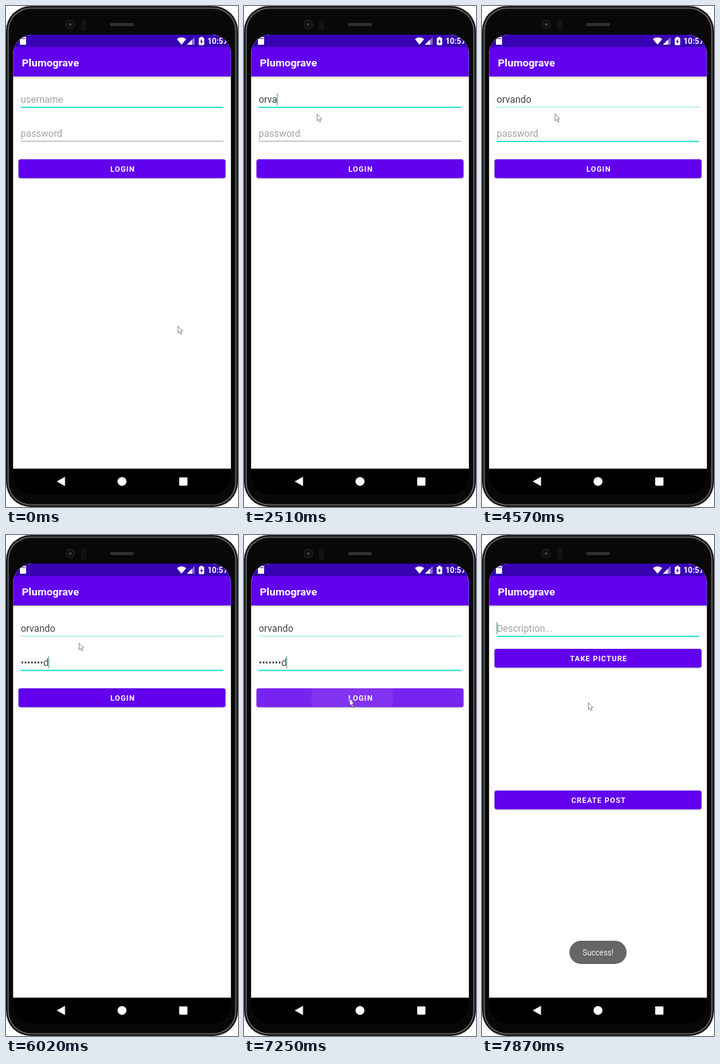
These frames come from a looping animation (300x647 px, 8 s). An HTML page with a canvas:

```html
<!DOCTYPE html>
<html lang="en">
<head>
<meta charset="utf-8">
<title>Login demo</title>
<style>
  html, body { margin: 0; width: 100%; height: 100%; overflow: hidden; background: #fff; }
  canvas { display: block; width: 300px; height: 647px; }
</style>
</head>
<body>
<canvas id="stage"></canvas>
<script>
const W = 300, H = 647, LOOP = 8000;
const PURPLE = '#6200ee', DEEP = '#3700b3', TEAL = '#03dac5', HINT = '#a3a3a3', INK = '#454545';
const canvas = document.getElementById('stage');
const ctx = canvas.getContext('2d');
const ratio = window.devicePixelRatio || 1;
canvas.width = W * ratio;
canvas.height = H * ratio;

// The screen refreshes in coarse ticks; every event below is timed in ticks.
const TICK = 206.6, FIRST_TICK = 222;
const FOCUS = 18, PRESS = 33, OPEN = 36;
const userStart = { text: 'orva', from: 6, to: 11 };
const userEnd = { text: 'ndo', from: 14, to: 17 };
const password = { text: 'password', from: 22, to: 28 };
const inputs = [userStart, userEnd, { from: FOCUS, to: FOCUS }, password, { from: OPEN, to: OPEN }];

const progress = (n, from, to) => Math.min(1, Math.max(0, (n - from) / (to - from)));
const ease = p => p * p * (3 - 2 * p);

function typed({ text, from, to }, n) {
  if (n < from) return '';
  return text.slice(0, 1 + Math.round((text.length - 1) * progress(n, from, to)));
}

// The caret blinks, three ticks on and two off, restarting with each input.
function caretVisible(n) {
  const last = Math.max(0, ...inputs.map(({ from, to }) => n < from ? 0 : Math.min(n, to)));
  return (n - last + 5) % 5 < 3;
}

function pointerAt(n) {
  const toField = ease(progress(n, -1, 3));
  const toButton = ease(progress(n, 28, PRESS));
  const drift = progress(n, 34, 37);
  return [222 - 128 * toField + 42 * toButton + drift, 413 - 274 * toField + 72 * toButton + 5 * drift];
}

function rect(x, y, w, h, color) {
  ctx.fillStyle = color;
  ctx.fillRect(x, y, w, h);
}

function rounded(x, y, w, h, r, color) {
  ctx.beginPath();
  ctx.roundRect(x, y, w, h, r);
  ctx.fillStyle = color;
  ctx.fill();
}

function disc(x, y, r, color) {
  ctx.beginPath();
  ctx.arc(x, y, r, 0, Math.PI * 2);
  ctx.fillStyle = color;
  ctx.fill();
}

function poly(color, ...points) {
  ctx.beginPath();
  for (let i = 0; i < points.length; i += 2) ctx.lineTo(points[i], points[i + 1]);
  ctx.closePath();
  ctx.fillStyle = color;
  ctx.fill();
}

function label(str, x, y, size, color, { weight = 400, align = 'left', spacing = 0 } = {}) {
  ctx.font = `${weight} ${size}px Roboto, sans-serif`;
  ctx.letterSpacing = spacing + 'px';
  ctx.textAlign = align;
  ctx.fillStyle = color;
  ctx.fillText(str, x, y);
  const width = ctx.measureText(str).width;
  ctx.letterSpacing = '0px';
  return width;
}

function drawBody() {
  const shell = (inset, color) => rounded(inset, inset, W - 2 * inset, H - 2 * inset, 32 - inset, color);
  shell(0, '#1c1c1c');
  shell(2.4, '#7c7c7c');
  shell(3.5, '#080808');

  disc(83, 24, 6.5, '#191919');
  disc(83, 24, 4, '#0c0c0e');
  disc(83, 24, 2, '#3a3a40');
  rounded(97, 17, 7, 15, 2, '#121212');
  rounded(134.5, 22, 31, 4, 2, '#303030');
}

function drawStatusBar() {
  rect(9, 37, 282, 16.5, DEEP);
  poly('#fff', 18, 43, 20.6, 40, 26, 40, 26, 50, 18, 50);
  for (let i = 0; i < 3; i++) rect(20.6 + i * 1.7, 41, .8, 2, DEEP);

  ctx.beginPath();
  ctx.moveTo(227, 50);
  ctx.lineTo(221, 42.7);
  ctx.quadraticCurveTo(227, 38.3, 233, 42.7);
  ctx.closePath();
  ctx.fillStyle = '#fff';
  ctx.fill();

  poly('rgba(255,255,255,.4)', 234, 50, 244, 40, 244, 50);
  poly('#fff', 234, 50, 240.5, 43.5, 240.5, 50);

  rounded(249.3, 41, 7, 9.5, 1, '#fff');
  rect(251.3, 39.8, 3, 1.5, '#fff');
  poly(DEEP, 253.4, 42.3, 250.9, 46.4, 252.5, 46.4, 252.2, 49.2, 254.7, 45.2, 253.1, 45.2);
  label('10:57', 260.5, 49, 10.2, '#fff', { weight: 700 });
}

function drawAppBar() {
  const shade = ctx.createLinearGradient(0, 91, 0, 94);
  shade.addColorStop(0, 'rgba(0,0,0,.22)');
  shade.addColorStop(1, 'rgba(0,0,0,0)');
  rect(9, 91, 282, 3, shade);
  rect(9, 53, 282, 38, PURPLE);
  label('Plumograve', 20.5, 78, 13.7, '#fff', { weight: 700 });
}

function drawField(baseline, text, hint, lineColor, lineHeight, caret) {
  const width = text ? label(text, 19, baseline, 12.35, INK) : 0;
  if (!text) label(hint, 19, baseline, 12.35, HINT);
  rect(19, baseline + 5.2, 262, lineHeight, lineColor);
  if (caret) rect(18.6 + width, baseline - 12.5, 1, 16, '#4a9f97');
}

function drawButton(y, text, held = -1) {
  ctx.save();
  ctx.shadowColor = 'rgba(0,0,0,.3)';
  ctx.shadowBlur = 2 * ratio;
  ctx.shadowOffsetY = .7 * ratio;
  rounded(16.2, y, 267.6, 24.2, 2.7, PURPLE);
  ctx.restore();
  if (held >= 0) {
    ctx.save();
    ctx.beginPath();
    ctx.roundRect(16.2, y, 267.6, 24.2, 2.7);
    ctx.clip();
    rect(16, y, 268, 25, `rgba(255,255,255,${Math.min(.14, .07 * (held + 1))})`);
    disc(140, y + 12, 24 * 2.2 ** held, 'rgba(255,255,255,.07)');
    ctx.restore();
  }
  label(text, 150.9, y + 15.8, 9.6, '#fff', { weight: 700, align: 'center', spacing: .8 });
}

function drawLogin(n) {
  const onPass = n >= FOCUS;
  const caret = caretVisible(n);
  const name = typed(userStart, n) + typed(userEnd, n);
  const masked = typed(password, n).replace(/.(?=.)/g, '•');
  drawField(125, name, 'username', onPass ? '#93e3da' : TEAL, onPass ? 1 : 1.4, caret && !onPass);
  drawField(169, masked, 'password', onPass ? TEAL : HINT, onPass ? 1.4 : 1, caret && onPass);
  drawButton(198, 'LOGIN', n - PRESS);
}

function drawPost(n) {
  drawField(125, '', 'Description...', TEAL, 1.4, caretVisible(n));
  drawButton(147, 'TAKE PICTURE');
  drawButton(330, 'CREATE POST');
  ctx.globalAlpha = progress(n, OPEN - 1, OPEN + 1);
  rounded(113, 524, 74, 30, 15, '#666');
  label('Success!', 150, 543, 10, '#f0f0f0', { align: 'center' });
  ctx.globalAlpha = 1;
}

function drawNavBar() {
  rect(9, 597.5, 282, 33.5, '#000');
  poly('#fff', 65.5, 614, 76.3, 608, 76.3, 620);
  disc(150, 614, 5.8, '#fff');
  rounded(224, 608.8, 10.6, 10.6, .8, '#fff');
}

function drawPointer(x, y) {
  ctx.save();
  ctx.translate(x + .5, y + .5);
  poly('#fff', 0, 0, 0, 8.8, 1.9, 7.1, 3.4, 10.4, 4.9, 9.7, 3.4, 6.5, 6, 6.3);
  ctx.lineWidth = .8;
  ctx.lineJoin = 'round';
  ctx.strokeStyle = 'rgba(0,0,0,.5)';
  ctx.stroke();
  ctx.restore();
}

function render(t) {
  const n = Math.floor((t - FIRST_TICK) / TICK);
  ctx.setTransform(ratio, 0, 0, ratio, 0, 0);
  rect(0, 0, W, H, '#fff');
  drawBody();

  ctx.save();
  ctx.beginPath();
  ctx.roundRect(9.2, 37, 281.6, 594, 25);
  ctx.clip();
  rect(9, 37, 282, 561, '#fff');
  drawStatusBar();
  drawAppBar();
  if (n < OPEN) drawLogin(n);
  else drawPost(n);
  drawNavBar();
  ctx.restore();

  drawPointer(...pointerAt(n));
}

const start = performance.now();
function tick() {
  render((performance.now() - start) % LOOP);
  requestAnimationFrame(tick);
}
tick();
</script>
</body>
</html>
```
